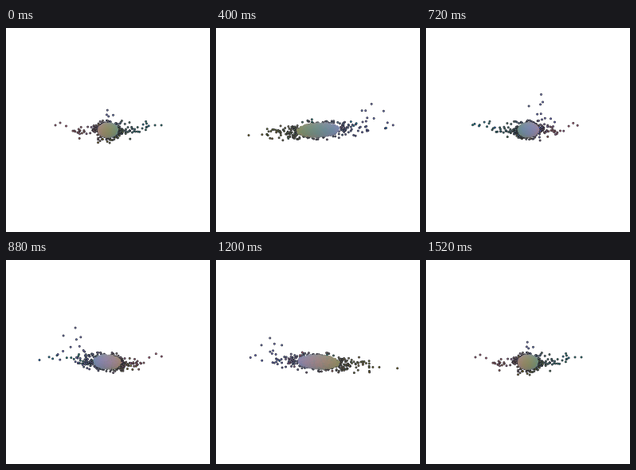
A matplotlib script that plays this animation: 256x256 px, repeating every 1600 ms.

```python
import numpy as np
import matplotlib.pyplot as plt
from matplotlib.animation import FuncAnimation

SIZE = 256
FRAMES = 20
CENTER = 128
CAMERA = 230  # distance from the eye to the middle of the cloud

rng = np.random.default_rng(11)


def blob(n, su, sw, sz):
    """Random cloud; columns are across, away and down."""
    u = rng.normal(0, su, n)
    w = rng.normal(-2, sw, n)
    z = rng.normal(0.5, sz, n) - 0.05 * w
    u = np.clip(u, -48, 48)
    w = np.clip(w, -62, 62)
    return np.column_stack([u, w, np.clip(z, -11, 13)])


def ellipsoid(n, radii):
    v = rng.normal(size=(n, 3))
    v /= np.linalg.norm(v, axis=1)[:, None]
    return v * rng.random((n, 1)) ** 0.4 * radii


def colors(p):
    u, w, z = p.T
    r = 0.52 - 0.008 * u - 0.001 * w
    g = 0.53 + 0.0015 * u - 0.0005 * w
    b = 0.53 + 0.0055 * w
    rgb = np.column_stack([r, g, b]) - 0.005 * z[:, None]
    return np.clip(rgb, 0.04, 0.96)


def project(p, angle):
    c, s = np.cos(angle), np.sin(angle)
    u, w, z = p.T
    depth = w * c - u * s
    scale = CAMERA / (CAMERA + depth)
    xy = CENTER + np.column_stack([u * c + w * s, z]) * scale[:, None]
    return xy, np.argsort(-depth)


outliers = np.array([
    (-1, 66, -32), (1, 80, -23), (-2, 59, -24), (8, 53, -23),
    (-2, 61, -15), (-5, 93, -6), (-4, 86, -9), (40, 72, -2),
    (4, 81, -2), (-4, -92, 7), (-2, -73, 6), (-1, -66, 6),
    (-66, 0, -6), (-60, 0, -9), (-53, 2, -5), (67, 0, -6),
    (59, 0, -6), (60, 40, -6), (56, 38, -4), (51, 36, -8),
    (48, -2, -8), (50, 5, -4), (43, 0, -2), (3, 68, -14),
])

dots = np.vstack([
    outliers,
    blob(100, 22, 11, 2.8),
    blob(70, 13, 18, 6.5),
    blob(370, 6.5, 25, 4.8),
])
core = ellipsoid(1700, [12.5, 27, 9])
core[:, 2] -= 0.04 * core[:, 1]

dot_colors = colors(dots)
core_colors = colors(core)

fig = plt.figure(figsize=(2.56, 2.56), dpi=100, facecolor="white")
ax = fig.add_axes([0, 0, 1, 1])
ax.set_xlim(0, SIZE)
ax.set_ylim(SIZE, 0)
ax.axis("off")

start = np.zeros((1, 2))
dot_art = ax.scatter(*start.T, s=2.3, linewidths=0.55,
                     edgecolors=[(0.14, 0.14, 0.18)])
core_art = ax.scatter(*start.T, s=2.6, linewidths=0, alpha=0.9)


def place(art, points, rgb, angle):
    xy, order = project(points, angle)
    art.set_offsets(xy[order])
    art.set_facecolor(rgb[order])


def draw(i):
    angle = 2 * np.pi * i / (FRAMES - 1)
    place(dot_art, dots, dot_colors, angle)
    place(core_art, core, core_colors, angle)
    return dot_art, core_art


anim = FuncAnimation(fig, draw, frames=FRAMES, interval=80,
                     repeat=True, repeat_delay=0)
plt.show()
```
